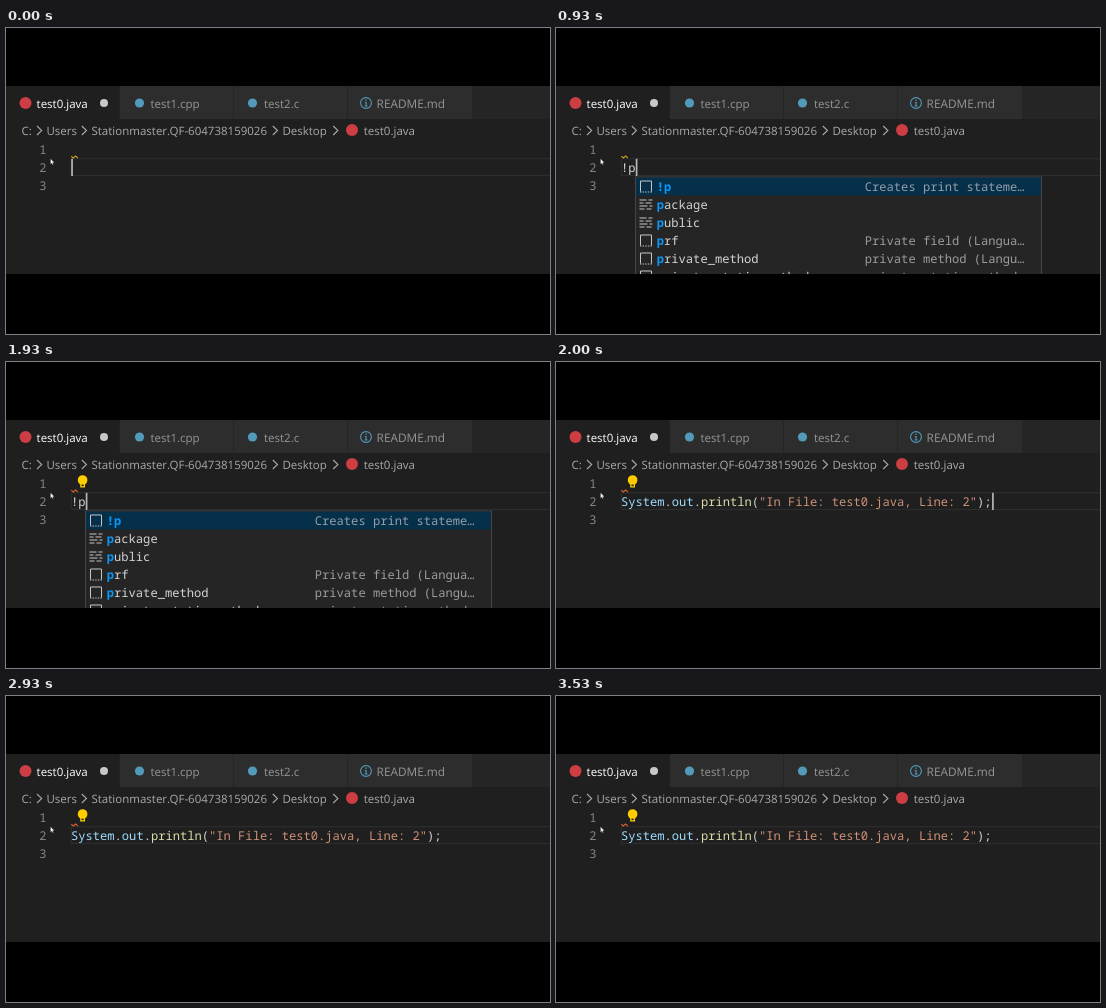
An HTML page for the animation above (3590 ms loop, 544 px wide and 306 px high).

```html
<!DOCTYPE html>
<html lang="en">
<head>
<meta charset="utf-8">
<title>Snippet completion</title>
<style>
  html, body { margin: 0; width: 100%; height: 100%; overflow: hidden; background: #000; }
  svg { display: block; width: 100%; height: 100%; }
  text { white-space: pre; text-rendering: geometricPrecision; }
  .ui { font: 11.5px "Open Sans", "Noto Sans", sans-serif; }
  .mono { font: 12.12px "Noto Sans Mono", "DejaVu Sans Mono", monospace; fill: #d4d4d4; }
  .num { fill: #858585; text-anchor: end; }
  .tab { fill: #969696; }
  .crumb { fill: #a9a9a9; }
  .hit { fill: #0a97f5; font-weight: 700; }
  .detail { fill: #d4d4d4; opacity: .68; }
  .name { fill: #9cdcfe; }
  .call { fill: #dcdcaa; }
  .str { fill: #ce9178; }
  .line { fill: none; stroke: #c5c5c5; }
</style>
</head>
<body>
<svg viewBox="0 0 544 306">
  <defs>
    <clipPath id="view"><rect y="58" width="544" height="188"/></clipPath>
    <g id="snippet" class="line">
      <path d="M1 11V.5H12V11"/>
      <path d="M.5 11.5H12.5" stroke-dasharray="1.4 1.2"/>
    </g>
    <g id="keyword" class="line" stroke-width="1.2">
      <path d="M0 1.5H7M9 1.5H13M0 4.5H4M6 4.5H12M0 7.5H8M10 7.5H13M0 10.5H5M7 10.5H12"/>
    </g>
  </defs>
  <rect width="544" height="306"/>
  <g clip-path="url(#view)">
    <rect y="58" width="544" height="188" fill="#1f1f1f"/>
    <g id="tabs"></g>
    <g id="crumbs"></g>
    <rect x="65.3" y="130.7" width="490" height="16.8" fill="none" stroke="#2d2d2d" stroke-width="1.2"/>
    <g id="numbers"></g>
    <path id="squiggle" d="M65.2 128.2L67.3 130L69.6 127.9L71.8 130" fill="none" stroke-width="1.1"/>
    <g id="bulb">
      <path d="M74.2 122.5C72.4 121 71.8 119.6 71.8 118A4.8 4.8 0 0 1 81.4 118C81.4 119.6 80.8 121 79 122.5V125.6H74.2Z" fill="#fc0"/>
      <path d="M75.5 122.6H77.7V124.2H75.5Z" fill="#1f1f1f"/>
    </g>
    <text id="code" class="mono" x="65" y="143.6"></text>
    <rect id="caret" y="130.8" width="1.7" height="17.2" fill="#b4b5b3"/>
    <g id="popup">
      <rect x="79.5" y="149" width="406" height="120" fill="#252526" stroke="#454545"/>
      <rect x="80" y="149.5" width="405" height="18" fill="#062f4a"/>
    </g>
    <path d="M44.4 130.6V136.4L45.7 135.2L46.6 137L47.5 136.6L46.7 134.8H48.5Z" fill="#fff" stroke="#111" stroke-width=".4"/>
  </g>
</svg>
<script>
const LOOP = 3590;
const RED = '#cc3e44', BLUE = '#519aba';
const $ = id => document.getElementById(id);

function add(parent, tag, attrs, content = '') {
  const el = document.createElementNS('http://www.w3.org/2000/svg', tag);
  for (const key in attrs) el.setAttribute(key, attrs[key]);
  el.innerHTML = content;
  parent.append(el);
  return el;
}
const label = (parent, cls, x, y, content) => add(parent, 'text', { class: cls, x, y }, content);
const disc = (parent, cx, cy, r, fill) => add(parent, 'circle', { cx, cy, r, fill });
const span = (cls, content) => `<tspan class="${cls}">${content}</tspan>`;

function buildTabs() {
  const tabs = $('tabs');
  add(tabs, 'rect', { y: 58, width: 544, height: 33, fill: '#252526' });
  add(tabs, 'rect', { y: 58, width: 113.3, height: 33, fill: '#1f1f1f' });
  for (const [x, width] of [[114, 113], [228, 113], [342, 124]])
    add(tabs, 'rect', { x, y: 58, width, height: 33, fill: '#2d2d2d' });
  disc(tabs, 19.5, 75, 6, RED);
  disc(tabs, 133.5, 75, 4.6, BLUE);
  disc(tabs, 246.5, 75, 4.6, BLUE);
  add(tabs, 'circle', { cx: 360, cy: 75, r: 5.4, fill: 'none', stroke: BLUE, 'stroke-width': 1.1 });
  add(tabs, 'path', { d: 'M360 71.6V73M358.8 74.5H360.1V78M358.6 78H361.6', fill: 'none', stroke: BLUE, 'stroke-width': 1.1 });
  label(tabs, 'ui', 30.6, 79.8, 'test0.java').setAttribute('fill', '#fff');
  label(tabs, 'ui tab', 144.4, 79.8, 'test1.cpp');
  label(tabs, 'ui tab', 258, 79.8, 'test2.c');
  label(tabs, 'ui tab', 370.6, 79.8, 'README.md').style.fontSize = '11.8px';
  disc(tabs, 98, 75, 4, '#c8c8c8');
}

function buildCrumbs() {
  const crumbs = $('crumbs');
  const parts = [[15.5, 'C:'], [40.4, 'Users'], [85.5, 'Stationmaster.QF-604738159026'],
    [276.4, 'Desktop'], [357.8, 'test0.java']];
  for (const [x, name] of parts) label(crumbs, 'ui crumb', x, 106.6, name);
  for (const x of [31, 75.8, 266.8, 327.2])
    add(crumbs, 'path', { d: `M${x} 98l4.7 4.5l-4.7 4.5`, fill: 'none', stroke: '#a9a9a9', 'stroke-width': 1.1 });
  disc(crumbs, 346, 102, 6, RED);
}

function buildPopup() {
  const popup = $('popup');
  const rows = [
    ['snippet', '!p', '', 'Creates print stateme…'],
    ['keyword', 'p', 'ackage', ''],
    ['keyword', 'p', 'ublic', ''],
    ['snippet', 'p', 'rf', 'Private field (Langua…'],
    ['snippet', 'p', 'rivate_method', 'private method (Langu…'],
    ['snippet', 'p', 'rivate_static_method', 'private static method…']
  ];
  rows.forEach(([icon, hit, rest, detail], i) => {
    const y = 162.6 + i * 18;
    add(popup, 'use', { href: '#' + icon, x: 83.5, y: y - 10.1 });
    label(popup, 'mono', 100.8, y, span('hit', hit) + rest);
    label(popup, 'mono detail', 308.8, y, detail);
  });
}

const STATEMENT = span('name', 'System') + '.' + span('name', 'out') + '.' + span('call', 'println') +
  '(' + span('str', '"In File: test0.java, Line: 2"') + ');';
// [start, markup, caret column]
const edits = [[0, '', 0], [400, '!', 1], [930, '!p', 2], [2000, STATEMENT, 51]];
const caretOff = [[1470, 1930], [2470, 3000], [3470, LOOP]];

const within = (t, [from, to]) => t >= from && t < to;
const show = (id, on) => $(id).setAttribute('visibility', on ? 'visible' : 'hidden');
let current;

function draw(t) {
  const edit = edits.filter(([start]) => t >= start).pop();
  if (edit !== current) {
    current = edit;
    $('code').innerHTML = edit[1];
    $('caret').setAttribute('x', 65.2 + edit[2] * 7.272);
  }
  show('caret', !caretOff.some(range => within(t, range)));
  show('popup', within(t, [930, 2000]));
  show('bulb', t >= 1200);
  $('squiggle').setAttribute('stroke', t < 1200 ? '#c4a01c' : '#d9632f');
}

buildTabs();
buildCrumbs();
buildPopup();
[1, 2, 3].forEach(n => label($('numbers'), 'mono num', 40.4, 107.6 + n * 18, n));

const start = performance.now();
function tick() {
  draw((performance.now() - start) % LOOP);
  requestAnimationFrame(tick);
}
tick();
</script>
</body>
</html>
```
